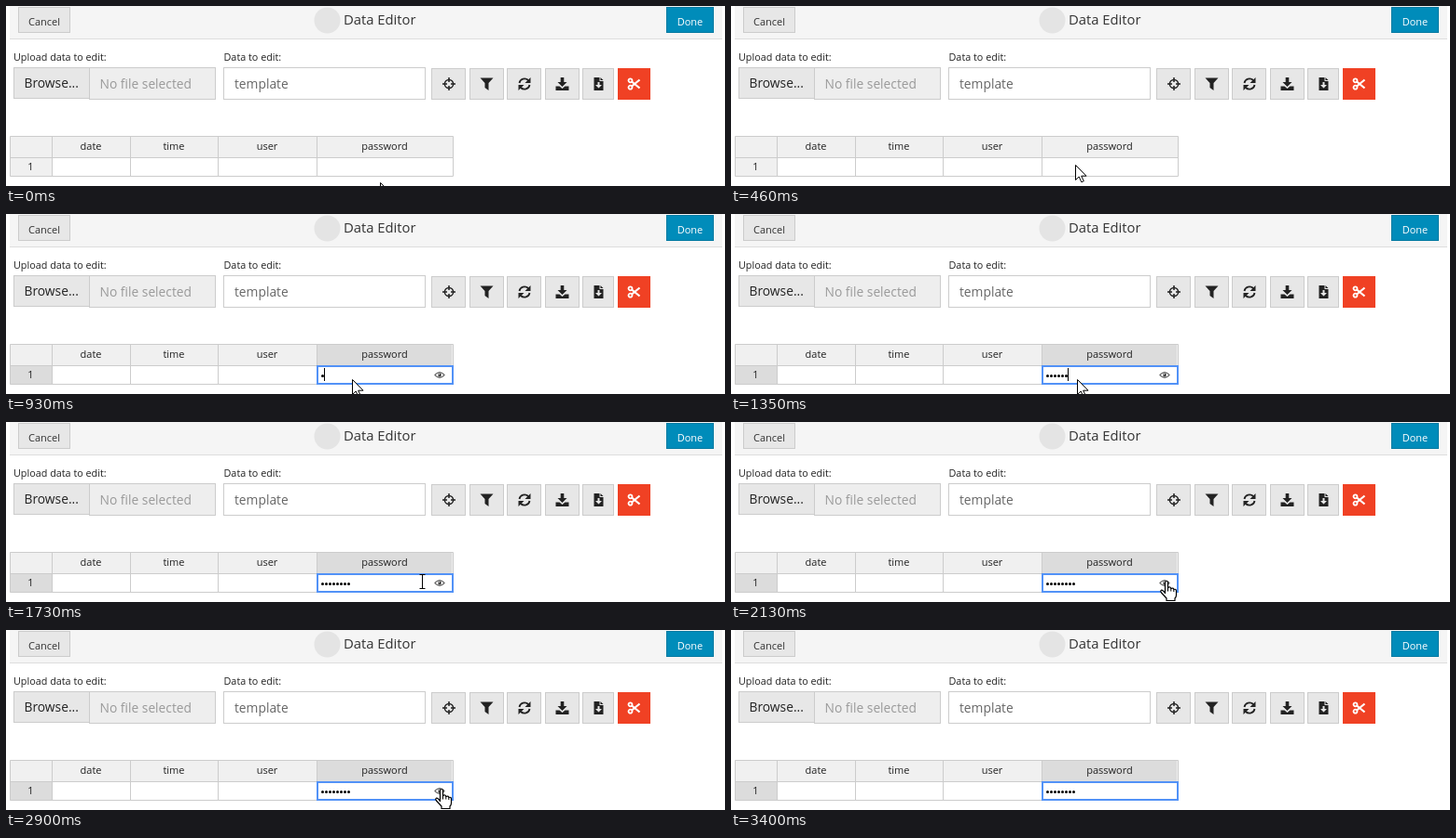
Recreate the animation shown at these times as an HTML page. Size 771 px wide and 194 px high, loop 3.46 s.

```html
<!DOCTYPE html>
<html lang="en">
<head>
<meta charset="utf-8">
<title>Data Editor</title>
<style>
  html, body { margin: 0; width: 100%; height: 100%; overflow: hidden; background: #fff; }
  svg { display: block; font: 11px "Open Sans", sans-serif; fill: #222; }
  .mid { text-anchor: middle; }
  .label { font-size: 10.8px; }
  .big { font-size: 13.8px; }
  .box { fill: #e7e7e7; stroke: #ccc; }
  .line { fill: none; stroke: #222; }
  .grid { fill: none; stroke: #ccc; }
  .cursor { fill: #fff; stroke: #000; stroke-linejoin: round; }
</style>
</head>
<body>
<svg width="771" height="194" viewBox="0 0 771 194">
  <!-- title bar -->
  <path fill="#f5f5f5" d="M4 0H768V35H4z"/>
  <path stroke="#ddd" d="M4 35.5H768"/>
  <rect class="box" x="13.5" y="1.5" width="55" height="27"/>
  <text class="mid" x="41" y="21" fill="#333">Cancel</text>
  <circle cx="344.5" cy="15.5" r="14" fill="#e4e4e4"/>
  <text x="362" y="20" font-size="14.8" fill="#333">Data Editor</text>
  <rect x="708.5" y="1.5" width="50" height="27" fill="#008cba" stroke="#0079a1"/>
  <text class="mid" x="733.5" y="21" fill="#fff">Done</text>

  <!-- form -->
  <text class="label" x="8" y="59">Upload data to edit:</text>
  <text class="label" x="233.500" y="59">Data to edit:</text>
  <rect class="box" x="8.5" y="66.5" width="81" height="33"/>
  <rect class="box" x="89.5" y="66.5" width="135" height="34" style="fill:#eee"/>
  <text class="big" x="19.500" y="88">Browse...</text>
  <text class="big" x="100.500" y="89" fill="#999">No file selected</text>
  <rect class="box" x="233.5" y="66.5" width="216" height="34" style="fill:#fff"/>
  <text class="big" x="245" y="89" fill="#666">template</text>

  <!-- toolbar -->
  <g id="buttons"></g>
  <g transform="translate(475 84)" class="line" stroke-width="1.5">
    <circle r="4.6"/><path d="M0-7V-2M0 2V7M-7 0H-2M2 0H7"/>
  </g>
  <path transform="translate(515.500 84)" d="M-7-6.5H7L2-1V7L-2 4V-1z"/>
  <g transform="translate(556 84)">
    <path class="line" stroke-width="1.800" d="M-5.5-1A5.6 5.6 0 0 1 4-4M5.5 1A5.6 5.6 0 0 1-4 4"/>
    <path d="M6.5-7V-1H.5zM-6.5 7V1H-.5z"/>
  </g>
  <path transform="translate(596.500 84)" d="M-1.8-7H1.8V-2H5L0 3-5-2H-1.8zM-7 2.5H-3L0 5 3 2.5H7V7H-7z"/>
  <g transform="translate(635.500 84)">
    <path d="M-5-7H1V-3H5V7H-5zM2-7L5-4H2z"/>
    <path fill="#e7e7e7" d="M-1-2H1V1H3.5L0 4.5-3.5 1H-1z"/>
  </g>
  <g transform="translate(673.500 84)" fill="none" stroke="#fff" stroke-width="1.800">
    <circle cx="-4" cy="-3.7" r="2"/><circle cx="-4" cy="3.7" r="2"/>
    <path stroke-width="2.2" d="M-2.5-2.5L6 4.5M-2.5 2.5L6-4.5"/>
  </g>

  <!-- table -->
  <path fill="#f0f0f0" d="M4 140H480V163H4zM4 163H49V184H4z"/>
  <path id="marked" fill="#dcdcdc" d="M334 141H478V163H334zM5 164H49V183H5z"/>
  <path class="grid" d="M4.5 140.5H479.5V183.5H4.5zM4 163.5H480M49.5 140V184M133.5 140V184M227.5 140V184M333.5 140V184"/>
  <g class="mid">
    <text x="91" y="155">date</text><text x="180" y="155">time</text>
    <text x="280" y="155">user</text><text x="406" y="155">password</text>
    <text x="26.5" y="177">1</text>
  </g>
  <rect id="outline" x="334" y="164" width="145" height="19" fill="#fff" stroke="#5292f7" stroke-width="2"/>
  <rect id="handle" x="475.5" y="178.5" width="5" height="5" fill="#4b89ff" stroke="#fff"/>
  <path id="dots" fill="none" stroke="#000" stroke-width="3" stroke-linecap="round" stroke-dasharray="0 4"/>
  <text id="plain" x="337.5" y="178" fill="#000">password</text>
  <path id="caret" stroke="#000"/>
  <g id="eye" transform="translate(465 173.5)">
    <path class="line" d="M-5.3 0Q0-5.5 5.3 0Q0 5.500-5.3 0z"/>
    <circle r="1.700"/><circle cx="-.5" cy="-.6" r=".7" fill="#fff"/>
  </g>

  <!-- pointer -->
  <circle id="halo" r="11.500" fill="#fff000" opacity=".65"/>
  <path id="arrow" class="cursor" d="M.5.5V16.5L4.2 13 6.8 18.8 9.3 17.7 6.7 12.2H12z"/>
  <path id="beam" class="line" style="stroke:#000" d="M-2.5-7.5H3.5M.5-7.5V7.5M-2.5 7.5H3.5"/>
  <g id="hand">
    <path class="cursor" stroke-width="1.2" d="M-1.5 13V1.5Q-1.5 0 0 0T1.5 1.5V7Q4.5 5.5 4.8 8Q7.5 6.7 7.8 9Q10.5 8 10.5 11V15Q10.5 17 9 18.5V21H0V18.5L-5.5 12.5Q-7 10.5-5.5 9.7Q-4 9.3-1.5 13z"/>
    <path class="line" style="stroke:#000" d="M1.5 7V11M4.8 8V11M7.8 9V11.5"/>
  </g>
</svg>
<script>
const LOOP = 3460;
const byId = id => document.getElementById(id);
const show = (id, on) => byId(id).style.display = on ? '' : 'none';
const moveTo = (id, x, y) => byId(id).setAttribute('transform', `translate(${x} ${y})`);

const buttons = [[456, 37], [497, 37], [537, 37], [578, 37], [618, 34], [656, 35]];
byId('buttons').innerHTML = buttons.map(([x, w], i) => {
  const red = i === 5 ? ' style="fill:#f04124;stroke:#f04124"' : '';
  return `<rect class="box" x="${x + .5}" y="67.5" width="${w - 1}" height="33"${red}/>`;
}).join('');

// Pointer poses, each held until the next: time, shape, x, y
const poses = [
  [0, 'arrow', 401, 190], [70, 'arrow', 396, 186], [150, 'arrow', 387, 180],
  [230, 'arrow', 378, 175], [310, 'arrow', 372, 172], [390, 'arrow', 369, 171],
  [780, 'arrow', 370, 174], [860, 'arrow', 371, 178],
  [1580, 'beam', 402, 175], [1650, 'beam', 432, 172], [1730, 'beam', 446, 172],
  [1810, 'beam', 453, 172], [1890, 'hand', 461, 173], [1970, 'hand', 465, 172],
  [2050, 'hand', 467, 171.5],
  [3080, 'arrow', 484, 173], [3150, 'arrow', 535, 174], [3230, 'arrow', 588, 178],
  [3310, 'arrow', 610, 186], [3400, 'none', 0, 0]
];
const keyTimes = [930, 1010, 1090, 1180, 1260, 1350, 1430, 1500];

function draw(t) {
  const within = (from, to) => t >= from && t < to;
  const typed = keyTimes.filter(time => time <= t).length;
  const revealed = within(2540, 2900);
  const caretX = 337.5 + 4 * typed;

  show('marked', t >= 620);
  show('outline', t >= 620);
  show('handle', within(620, 930));
  show('dots', typed && !revealed);
  byId('dots').setAttribute('d', `M339.5 174.5h${Math.max(0, typed - 1) * 4 + .1}`);
  show('plain', revealed);
  show('caret', within(930, 1730));
  byId('caret').setAttribute('d', `M${caretX} 166V180`);
  show('eye', within(930, 3400));

  const firstClick = within(470, 620);
  show('halo', firstClick || within(2280, 2540) || within(2720, 2900));
  moveTo('halo', firstClick ? 369 : 466, 171);

  const [, shape, x, y] = poses.findLast(pose => pose[0] <= t);
  for (const id of ['arrow', 'beam', 'hand']) {
    show(id, id === shape);
    moveTo(id, x, y);
  }
}

function tick() {
  draw(performance.now() % LOOP);
  requestAnimationFrame(tick);
}
tick();
</script>
</body>
</html>
```
